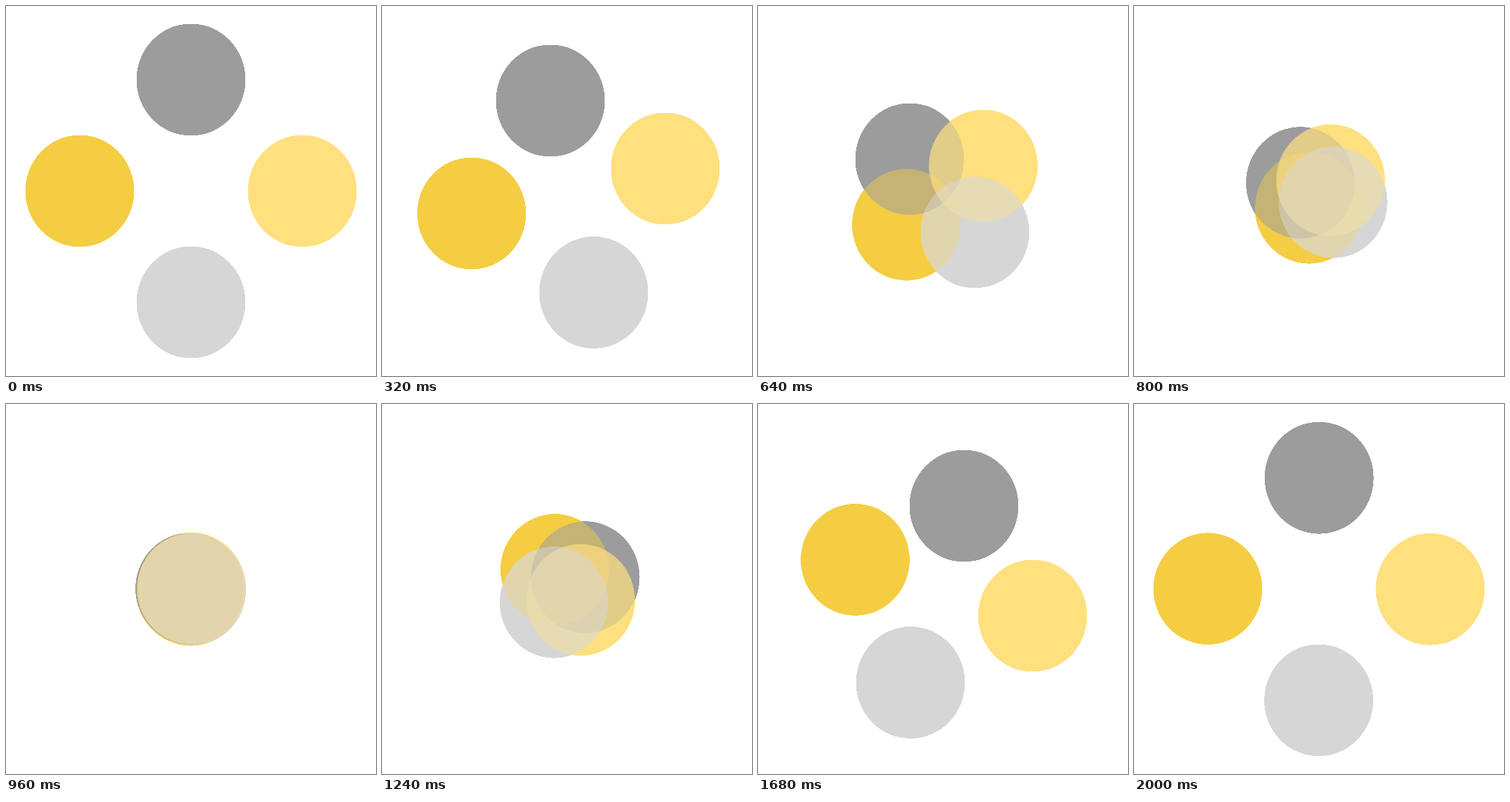
An HTML page with a canvas that plays this animation: 512 by 512 pixels, repeating every 2.04 s.

```html
<!DOCTYPE html>
<html>
<head>
<meta charset="utf-8">
<style>
html, body { margin: 0; width: 100%; height: 100%; overflow: hidden; background: #fff; }
canvas { display: block; }
</style>
</head>
<body>
<canvas width="512" height="512"></canvas>
<script>
const canvas = document.querySelector('canvas');
const ctx = canvas.getContext('2d');

const LOOP = 2040, TICK = 40, HALF = 22.5, START = 0.5;
// Path parameters at which the inward and outward waypoints are passed
const IN = [0, 0.2022, 0.648, 1];
const OUT = [0, 0.417, 0.7407, 1];

// Waypoints are offsets from the stage centre; listed from bottom to top
const balls = [
  { color: '#9d9d9d', alpha: 0.8, home: [0, -154],
    inward: [[-23, -125], [-46, -44]], outward: [[46.5, -61], [29, -115]] },
  { color: '#f4cf47', alpha: 0.4, home: [-154, 0],
    inward: [[-132, 31], [-50.5, 46.5]], outward: [[-65.5, -55], [-121.5, -40.5]] },
  { color: '#ffe080', alpha: 0.65, home: [154, 0],
    inward: [[136, -31], [55.5, -35]], outward: [[69.5, 39.5], [124, 37]] },
  { color: '#d8d8d8', alpha: 0.5, home: [0, 154],
    inward: [[37, 140.5], [44, 57]], outward: [[-47.5, 72], [-45, 129.5]] }
];

const ease = x => x * x * (3 - 2 * x);

// Cubic curve through four points at the given parameters
function curve(points, knots, s) {
  const pos = [0, 0];
  points.forEach((p, i) => {
    let w = 1;
    knots.forEach((k, j) => { if (j !== i) w *= (s - k) / (knots[i] - k); });
    pos[0] += w * p[0];
    pos[1] += w * p[1];
  });
  return pos;
}

function place(ball, step) {
  const x = Math.min(2, Math.max(0, (step - START) / HALF));
  const centre = [0, 0];
  return x < 1
    ? curve([ball.home, ...ball.inward, centre], IN, ease(x))
    : curve([centre, ...ball.outward, ball.home], OUT, ease(x - 1));
}

function draw(now) {
  // Eleven poses are spread over every twelve ticks
  const step = Math.floor(Math.floor(now % LOOP / TICK) * 11 / 12);
  ctx.clearRect(0, 0, 512, 512);
  for (const ball of balls) {
    const [x, y] = place(ball, step);
    ctx.globalAlpha = ball.alpha;
    ctx.fillStyle = ball.color;
    ctx.beginPath();
    ctx.ellipse(256 + x, 256 + y, 75, 77, 0, 0, 2 * Math.PI);
    ctx.fill();
  }
  // Stacking the picture on itself makes the mixed colours opaque
  ctx.globalAlpha = 1;
  for (let i = 0; i < 4; i++) ctx.drawImage(canvas, 0, 0);
}

const begin = performance.now();
function frame() {
  draw(performance.now() - begin);
  requestAnimationFrame(frame);
}
frame();
</script>
</body>
</html>
```
